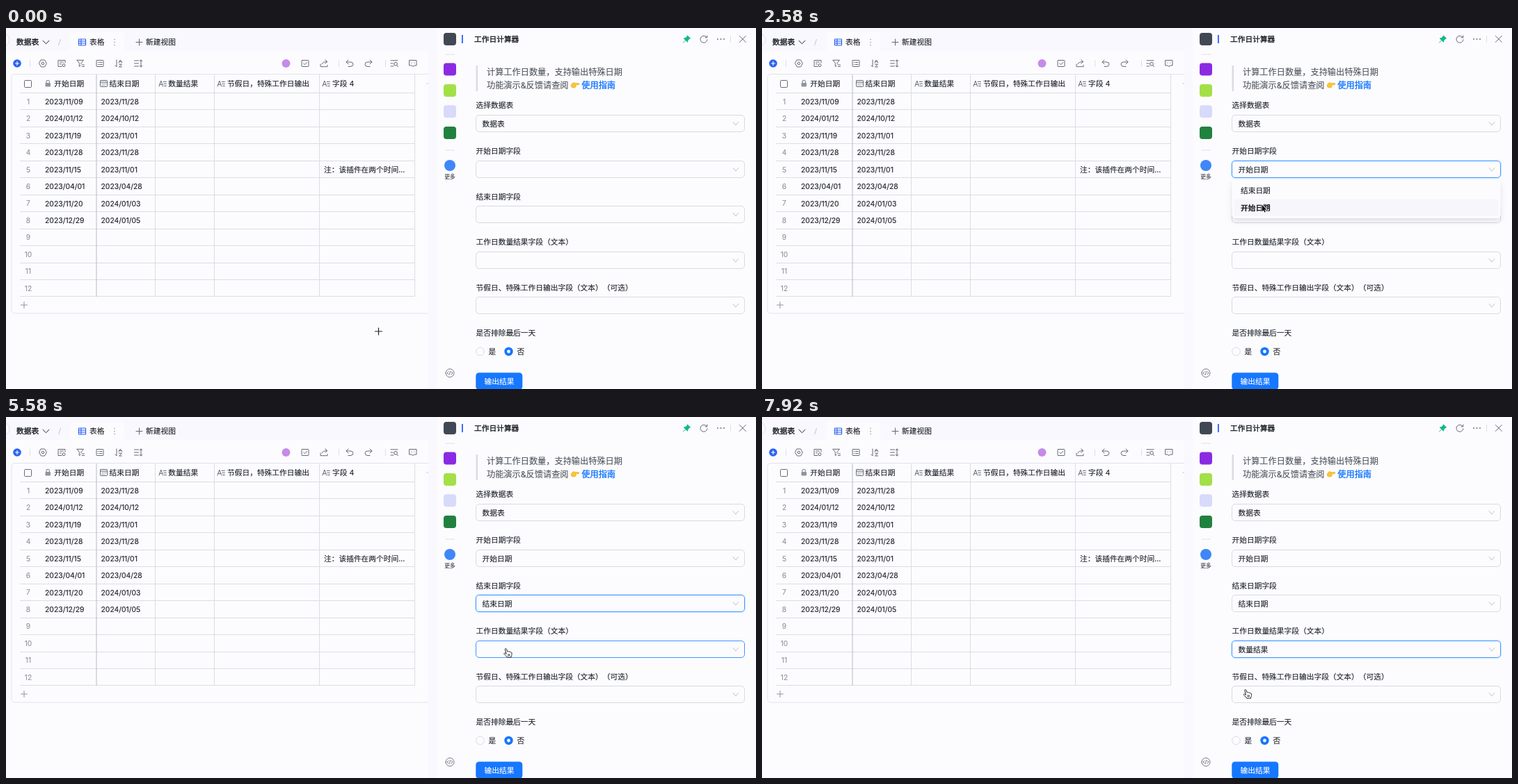
These frames come from a looping animation (1078x520 px, 8 s). An HTML page:

```html
<!DOCTYPE html>
<html lang="zh-CN">
<head>
<meta charset="utf-8">
<title>工作日计算器</title>
<style>
  html, body { margin: 0; width: 100%; height: 100%; overflow: hidden; background: #fcfcff; }
  svg { display: block; width: 1078px; height: 520px; }
  text {
    font-family: Inter, "Noto Sans CJK SC", "Noto Sans CJK", sans-serif;
    text-spacing-trim: space-all;
    white-space: pre;
  }
  .menu-box { filter: drop-shadow(0 4px 5px rgba(0, 0, 0, .09)) drop-shadow(0 2px 2px rgba(0, 0, 0, .04)); }
</style>
</head>
<body>
<svg id="stage" viewBox="0 0 1078 520"></svg>
<script>
const INK = '#1f2329', GREY = '#646a73', FAINT = '#8f959e', LINE = '#dedee6';
const BLUE = '#1677ff', ACCENT = '#2b62f4', PAGE = '#fcfcff', TINT = '#f8f8fe';
const FS = 10.72, CELL = 24.45, FIELD_H = 24, OPTION_H = 24.5;
const MEDIUM = { 'stroke-width': .4 };
const stage = document.getElementById('stage');

function el(name, attrs, parent = stage) {
  const node = document.createElementNS('http://www.w3.org/2000/svg', name);
  for (const key in attrs) node.setAttribute(key, attrs[key]);
  return parent.appendChild(node);
}
const rect = (x, y, width, height, fill, more = {}, parent) =>
  el('rect', { x, y, width, height, fill, ...more }, parent);
const circle = (cx, cy, r, fill, more = {}) => el('circle', { cx, cy, r, fill, ...more });
const line = (x1, y1, x2, y2, stroke = LINE, width = 1) =>
  el('line', { x1, y1, x2, y2, stroke, 'stroke-width': width });
const icon = (x, y, d, stroke = GREY, more = {}, parent) =>
  el('path', { d, stroke, fill: 'none', 'stroke-width': 1, 'stroke-linejoin': 'round',
    'stroke-linecap': 'round', transform: `translate(${x} ${y})`, ...more }, parent);
// A hairline stroke gives the glyphs their slightly heavy look.
function text(x, middle, str, size = FS, more = {}, parent) {
  const fill = more.fill || INK;
  const node = el('text', { x, y: middle + size * .37, 'font-size': size, fill,
    stroke: fill, 'stroke-width': .14, ...more }, parent);
  node.textContent = str;
  return node;
}
const snap = v => Math.floor(v) + .5;
const ring = (r, x = 0, y = 0) =>
  `M${x - r} ${y}a${r} ${r} 0 1 0 ${2 * r} 0a${r} ${r} 0 1 0 ${-2 * r} 0`;
const BOX = 'M-4.3-4.5H4.3Q5-4.5 5-3.8V3.8Q5 4.5 4.3 4.5H-4.3Q-5 4.5-5 3.8V-3.8Q-5-4.5-4.3-4.5Z';
const PLUS = 'M-4.5 0H4.5M0-4.5V4.5';

function drawTabs() {
  rect(0, 0, 619, 520, TINT);
  el('path', { d: 'M0 37Q0 33 4 33H88Q92 33 92 29V11Q92 6 97 6H165Q170 6 170 11V29Q170 33 174 33H607V520H0Z', fill: PAGE });
  circle(-4, 17, 9, PAGE, { stroke: LINE });
  text(15, 20.5, '数据表', FS, MEDIUM);
  icon(57.5, 20.5, 'M-4.5-2.2 0 2.2 4.5-2.2', INK);
  line(75.5, 25, 78.5, 16, '#c4c5cf');
  icon(109.5, 20.5, BOX + 'M-5-1.5H5M-5 1.5H5M-1.6-4.5V4.5', ACCENT, { 'stroke-width': 1.2 });
  text(120, 20.5, '表格');
  for (const y of [16.5, 20.5, 24.5]) circle(156, y, .8, FAINT);
  icon(191.5, 20.5, PLUS);
  text(201, 20.5, '新建视图');
}

function drawToolbar() {
  const y = 51;
  circle(16, y, 5.8, ACCENT);
  icon(16, y, 'M-2.5 0H2.5M0-2.5V2.5', '#fff', { 'stroke-width': 1.2 });
  for (const x of [34.5, 478.5, 545.5]) line(x, 46, x, 56);
  const undo = 'M-2-5-5-2-2 1M-5-2H1Q5-2 5 1.2T1 4.5H-2';
  const tools = {
    53: 'M-2.6-5H2.6L5.3 0 2.6 5H-2.6L-5.3 0Z' + ring(1.8),
    80: 'M5-1V-4.5H-5V4.5H0M-2.5-2H2.5M-2.5 .8H-.5' + ring(2, 3, 2.7),
    107: 'M-5-4.7H4.5L1-.5V1M-5-4.7-1.7-.5V4.5L.3 3.2M2.5 2H5.5M2.5 4.5H5.5',
    135: BOX + 'M-2.8-1.5H-2.2M-.5-1.5H3M-2.8 1.5H-2.2M-.5 1.5H3',
    162: 'M-3-5V5L-5 3M0-1 2.4-5 4.8-1M1-2.4H3.8M.5 1.2H4.5L.5 5H4.5',
    190: 'M-5.5-4H.5M-5.5 0H.5M-5.5 4H.5M4-5V5M2.3-3.2 4-5 5.7-3.2M2.3 3.2 4 5 5.7 3.2',
    430: BOX + 'M-2.3 0-.5 1.8 2.6-1.5',
    457: 'M-5 1V4.7H5V2.5M-3 1Q-2-2.5 4.5-2.5M1.8-5.2 4.8-2.5 1.8 .2',
    494: undo,
    558: 'M-5-4.2H5M-5 0H-2M-5 4H-1' + ring(2.4, 2, .8) + 'M3.8 2.6 5.5 4.6',
    585: 'M-5-4.5H5V3H1.5L0 4.8-1.5 3H-5ZM-2-.8H-1.8M1.8-.8H2'
  };
  for (const x in tools) icon(x, y, tools[x]);
  icon(521, y, undo, GREY, { transform: `translate(521 ${y}) scale(-1 1)` });
  circle(402.5, y, 6, '#c58be8');
}

function drawTable() {
  icon(0, 0, 'M607 66.5H13Q8 66.5 8 71.5V406Q8 411 13 411H607', '#e2e2ee');
  const top = 93.5, bottom = top + 12 * CELL;
  for (let i = 0; i <= 12; i++) {
    const y = snap(top + i * CELL);
    line(20, y, 587.5, y, '#dcdce2');
  }
  for (const x of [214.5, 299.5, 450.5, 587.5]) line(x, 67, x, bottom, '#dcdce2');
  line(130, 67, 130, bottom, '#b9bac2');

  rect(26.5, 75.5, 10, 10, 'none', { stroke: GREY, rx: 1 });
  rect(56.5, 79, 7.5, 5.5, FAINT, { rx: 1 });
  icon(60.2, 79, 'M-2.2 0V-1.5Q-2.2-3.6 0-3.6T2.2-1.5V0', FAINT, { 'stroke-width': 1.2 });
  icon(140.5, 80, BOX + 'M-5-2H5M-2.5 .2H-2M0 .2H.5M2.5 .2H3M-2.5 2.4H-2M0 2.4H.5');
  for (const x of [225, 309, 460])
    icon(x, 80, 'M-5 4-2.2-4 .6 4M-4 1.4H-.4M1.2-2.5H5.4M1.8 .5H5.4M2.4 3.5H5.4');
  [[69.3, '开始日期'], [148.6, '结束日期'], [233.3, '数量结果'], [318, '节假日，特殊工作日输出'], [469, '字段 4']]
    .forEach(([x, name]) => text(x, 80, name));
  line(604.5, 80, 607, 80, '#c4c5cf');

  const dates = ['2023/11/09 2023/11/28', '2024/01/12 2024/10/12', '2023/11/19 2023/11/01',
    '2023/11/28 2023/11/28', '2023/11/15 2023/11/01', '2023/04/01 2023/04/28',
    '2023/11/20 2024/01/03', '2023/12/29 2024/01/05'];
  for (let i = 0; i < 12; i++) {
    const y = 106 + i * CELL;
    text(32, y, i + 1, 10.2, { fill: FAINT, 'text-anchor': 'middle' });
    if (!dates[i]) continue;
    const [start, end] = dates[i].split(' ');
    text(56, y, start, 10.4);
    text(136.5, y, end, 10.4);
  }
  text(457, 203.7, '注：该插件在两个时间...');
  icon(26, 399, PLUS, FAINT);
}

function drawSidebar() {
  rect(619, 0, 459, 520, PAGE);
  const apps = { 16: '#414854', 59.5: '#8a2be2', 90: '#a3e048', 120.3: '#d8dafa', 151: '#21823f' };
  for (const y in apps) rect(629, y - 9, 18, 18, apps[y], { rx: 4 });
  for (const y of [38, 176]) line(632, y, 645, y);
  circle(638, 198, 8, '#3f86f7');
  text(638, 214, '更多', 7.8, { 'text-anchor': 'middle', fill: '#3c4149' });
  icon(638, 497, ring(6) + 'M-2-2-4 0-2 2M2-2 4 0 2 2M.6-2.4-.6 2.4', GREY, { 'stroke-width': .9 });
  rect(655, 10, 1.8, 12, ACCENT);
}

function drawPanel() {
  text(673, 16, '工作日计算器', FS, MEDIUM);
  icon(978.5, 16, 'M1-5 5-1 3.8-.6 1.5 1.7 1 4.2-4.2-1-1.7-1.5 .6-3.8ZM-2 2-5 5', '#12b886', { fill: '#12b886' });
  icon(1003, 16, 'M4.2-2.5A5 5 0 1 0 5 .8M4.8-5V-2.2H2');
  for (const x of [1023, 1027.5, 1032]) circle(x, 16, .9, GREY);
  line(1041.5, 11, 1041.5, 21);
  icon(1058.8, 16, 'M-4.5-4.5 4.5 4.5M4.5-4.5-4.5 4.5');

  rect(675.5, 54, 2.6, 37, '#dcdce4');
  text(691, 63.5, '计算工作日数量，支持输出特殊日期', 12.2, { fill: '#53585f' });
  text(691, 82, '功能演示&反馈请查阅', 12.2, { fill: '#53585f' });
  icon(817.7, 82.5, 'M6-2Q6-.7 5-.7H1.5Q2 3.5-1 3.5H-3.2Q-5.5 3-5.5 .5-5.5-1.8-2.6-3.6-1-4.5-.6-2.9H5Q6-2.9 6-2Z',
    '#e9a21c', { fill: '#fdc436', 'stroke-width': .6 });
  text(827.3, 82, '使用指南', 12.2, { fill: BLUE, ...MEDIUM });

  ['选择数据表', '开始日期字段', '结束日期字段', '工作日数量结果字段（文本）',
    '节假日、特殊工作日输出字段（文本）（可选）', '是否排除最后一天']
    .forEach((label, i) => text(675.5, 111.5 + i * 65.55, label));

  circle(681.5, 466, 5.8, PAGE, { stroke: '#d9d9e0' });
  text(693.5, 466, '是');
  circle(722.5, 466, 6.2, BLUE);
  circle(722.5, 466, 2.4, '#fff');
  text(734.5, 466, '否');
  rect(675.3, 496.5, 67, 24.5, BLUE, { rx: 4.6 });
  text(687.5, 508.7, '输出结果', FS, { fill: '#fff' });
}

const fieldTop = i => snap(125.5 + i * 65.55);

function makeField(i) {
  const top = fieldTop(i);
  const halo = rect(674.3, top - 1.2, 388.4, FIELD_H + 2.4, 'none',
    { rx: 5.6, stroke: '#0591ff', 'stroke-opacity': .12, 'stroke-width': 1.4 });
  const border = rect(675.5, top, 386, FIELD_H, PAGE, { rx: 4.6 });
  icon(1048.8, top + 12.2, 'M-3.8-2.2 0 2.4 3.8-2.2', '#bfc0c8');
  return { halo, border, value: text(684.5, top + 12.2, i ? '' : '数据表') };
}

function makeMenu({ field, items }) {
  const top = fieldTop(field) + FIELD_H + 3.4;
  const group = el('g', {});
  rect(675.3, top, 386.4, 6.2 + items.length * OPTION_H, '#fdfdff', { rx: 5, class: 'menu-box' }, group);
  const bar = rect(678.5, 0, 380, OPTION_H, '#f6f6fb', { rx: 3 }, group);
  const labels = items.map((s, i) => text(688, top + 15.2 + i * OPTION_H, s, FS, {}, group));
  return { top, group, bar, labels };
}

drawTabs(); drawToolbar(); drawTable(); drawSidebar(); drawPanel();

// Each picker: hovered, opened, option chosen, blurred (ms).
const DATES = ['结束日期', '开始日期'];
const pickers = [
  { field: 1, hover: 700, open: 1220, pick: 2520, blur: 3400, items: DATES, chosen: 1 },
  { field: 2, hover: 3080, open: 3760, pick: 4870, blur: 5600, items: DATES, chosen: 0 },
  { field: 3, hover: 5500, open: 5650, pick: 7210, blur: 9000,
    items: ['数量结果', '节假日，特殊工作日输出', '字段 4'], chosen: 0 }
];
const fields = [0, 1, 2, 3, 4].map(makeField);
pickers.forEach(p => p.menu = makeMenu(p));

const cursors = {
  cross: icon(0, 0, 'M-5 0H5M0-5V5', '#222', { 'stroke-width': 1.2 }),
  hand: icon(0, 0, 'M-4.2-5.2C-4.6-6.7-2.7-7-2.2-5.7L-.9-2.2C-.3-2.9 1-2.7 1.3-1.8 2-2.4 3.2-2.1 3.4-1.2 4.4-1.6 5.3-1 5.4 0 5.7 2 5.4 3.4 4.6 4.8V6.2H-1.1C-1.8 4.5-3.6 3.6-5.4 1.5-6.2 .4-4.7-.6-3.7 .3L-2.7 1.2ZM.4 1.8V4M2.2 1.8V4',
    '#222', { fill: '#fff' }),
  arrow: icon(0, 0, 'M-1-4.5V5.5L1.3 3.4 2.8 6.6 4.3 5.9 2.9 2.8H6Z', '#fff',
    { fill: '#111', 'stroke-width': 1.6, 'paint-order': 'stroke' })
};

// Cursor stops: time, x, y of the glyph's middle.
const path = [
  [0, 535.5, 437], [167, 546.5, 444], [340, 546.5, 444], [750, 740, 203], [1667, 740, 203],
  [2000, 724, 248], [2090, 724, 248], [2420, 719.5, 259], [3000, 719.5, 259], [3580, 734.5, 274],
  [3920, 734.5, 274], [4410, 722, 311], [4600, 722, 311], [4667, 722.5, 311.5], [5090, 722.5, 311.5],
  [5580, 721.5, 340], [6090, 721.5, 340], [6500, 717, 391], [6580, 717, 391], [7000, 693, 374],
  [7590, 693, 374], [7915, 698, 399]
];
function cursorAt(t) {
  const next = path.findIndex(stop => stop[0] > t);
  if (next < 0) return path[path.length - 1].slice(1);
  const [t0, x0, y0] = path[next - 1], [t1, x1, y1] = path[next];
  const p = (t - t0) / (t1 - t0), e = p * p * (3 - 2 * p);
  return [x0 + (x1 - x0) * e, y0 + (y1 - y0) * e];
}

const spans = [[0, 0], [1, 2], [5, 9], [11, 12], [15, 18], [20, 24], [26, 35], [37, 43], [46, 46],
  [48, 53], [56, 56], [58, 65], [67, 70], [74, 83], [84, 84], [87, 89], [92, 95]];
function recordedTime(ms) {
  const tick = Math.floor((ms + 4) * 12 / 1000);
  const span = spans.filter(s => s[0] <= tick).pop();
  return Math.min(tick, span[1]) * 1000 / 12;
}

const clamp = (v, lo, hi) => Math.max(lo, Math.min(hi, v));
function visibility(p, t) {
  const opening = clamp((t - p.open) / 200, 0, 1), closing = clamp((t - p.pick) / 200, 0, 1);
  return (1 - (1 - opening) ** 4) * (1 - closing ** 5);
}

function render(t) {
  const [x, y] = cursorAt(t), tipX = x - 2, tipY = y - 6;
  let clickable = tipX > 675 && fields.some((_, i) => tipY > fieldTop(i) && tipY < fieldTop(i) + FIELD_H);

  fields.forEach((f, i) => {
    const p = pickers.find(q => q.field === i);
    const lit = p && t >= p.hover && t < p.blur;
    f.border.setAttribute('stroke', lit ? '#4096ff' : '#d9d9e0');
    f.halo.style.display = lit && t >= p.open ? '' : 'none';
    if (p) f.value.textContent = t >= p.pick ? p.items[p.chosen] : '';
  });

  for (const p of pickers) {
    const { top, group, bar, labels } = p.menu, shown = visibility(p, t);
    group.style.display = shown > 0 ? '' : 'none';
    group.setAttribute('opacity', shown);
    const scale = .8 + .2 * shown;
    group.setAttribute('transform', `translate(0 ${top * (1 - scale)}) scale(1 ${scale})`);
    const row = clamp(Math.floor((tipY - top - 3) / OPTION_H), 0, p.items.length - 1);
    bar.setAttribute('y', top + 3.1 + row * OPTION_H);
    labels.forEach((label, i) =>
      label.setAttribute('font-weight', t >= p.pick && i === p.chosen ? 600 : 400));
    if (t >= p.open && t < p.pick) clickable = true;
  }

  const kind = x < 607 ? 'cross' : clickable ? 'hand' : 'arrow';
  for (const name in cursors) {
    cursors[name].style.display = name === kind ? '' : 'none';
    cursors[name].setAttribute('transform', `translate(${x} ${y})`);
  }
}

function loop() {
  render(recordedTime(performance.now() % 8000));
  requestAnimationFrame(loop);
}
loop();
</script>
</body>
</html>
```
